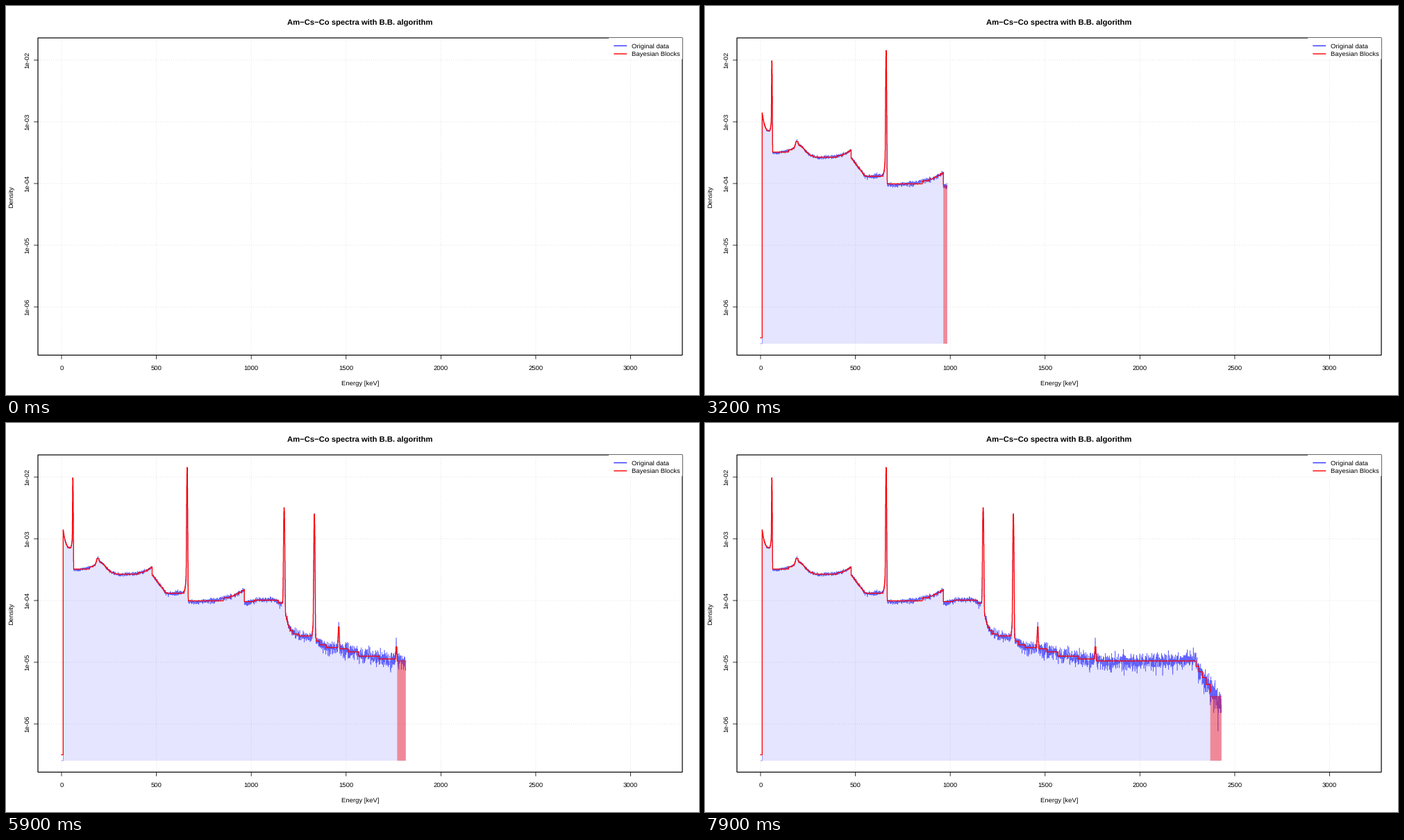
Write a matplotlib script that moves like this. It is 998 by 561 pixels and loops after 8000 ms.

```python
import numpy as np
import matplotlib.pyplot as plt
from matplotlib.animation import FuncAnimation
from matplotlib.patches import Polygon, Rectangle

W, H, PX = 998, 561, 0.72           # stage size, points per pixel
FRAMES, BINS_PER_FRAME = 80, 40
BIN = 0.769                         # keV per channel
FLOOR_Y, SHADE_FROM = 487, 32
BLUE, RED = (0, 0, 1, 0.6), "red"

plt.rcParams.update({"font.family": "Liberation Sans", "text.hinting": "none",
                     "path.simplify": False, "path.snap": False})


def x_px(energy):
    return 80 + np.asarray(energy) * 0.27317


def y_px(density):
    return 78 - 89 * (np.log10(density) + 2)


def density_at(y):
    return 10 ** (-2 - (np.asarray(y) - 78) / 89)


UNIT = density_at(FLOOR_Y)          # density of a single count


# Shapes in energy, all between 0 and 1
def bump(e, mu, sigma):
    return np.exp(-0.5 * ((e - mu) / sigma) ** 2)


def rise(e, edge, scale):
    return np.where(e < edge, np.exp(np.minimum(e - edge, 0) / scale), 0)


def ramp(e, a, b):
    return np.clip((e - a) / (b - a), 0, 1)


def settle(e, start, scale):
    return 1 - np.exp(-np.maximum(e - start, 0) / scale)


def compton_edge(e):
    return e / (1 + 511 / (2 * e))


# Photopeaks: energy, top, width
PEAKS = [(59.5, 79, 1.2), (661.7, 64, 1.55), (1173.2, 122, 2.0),
         (1332.5, 131, 1.9), (1460.8, 292, 2.5), (1764.5, 320, 2.5)]
# Compton shelves: energy, rise to the edge, fall after it, step at the line
SHELVES = [(661.7, 12, 27, 13, 3), (1173.2, 19, -4, 41, 25),
           (1332.5, 0, 12, 18, 40)]


def continuum(e):
    """Height of the smooth background, in stage pixels."""
    low = 28 + 31 * np.exp(-(e - 8) / 14) + 22 * rise(e, 59.5, 5)
    y = 212 - np.where(e < 61.5, low, 0)
    y += 7 * ramp(e, 220, 300) - 3 * bump(e, 150, 30)
    y -= 10 * bump(e, 205, 25) + 8 * bump(e, 190, 6)        # backscatter
    for line_e, up, fall, step, scale in SHELVES:
        edge = compton_edge(line_e)
        y -= up * rise(e, edge, 0.095 * edge)
        y += fall * ramp(e, edge, edge + 75) + step * settle(e, line_e, scale)
    y += 19 * settle(e, 1500, 150) - 8 * rise(e, 2295, 60)
    return y + 65 * ramp(e, 2290, 2430)


def spectrum(e):
    rho = density_at(continuum(e))
    for mu, top, sigma in PEAKS:
        shape = bump(e, mu, sigma) + 0.03 * rise(e, mu, 4)
        rho += (density_at(top) - rho) * shape
    return np.where(e < 8, density_at(478.5), rho)


def split_blocks(rho):
    """Start a block wherever the level leaves the noise band of the last."""
    y, tol = y_px(rho), 1 + 35 / np.sqrt(rho / UNIT)
    starts = [0]
    for i in range(1, len(y)):
        if abs(y[i] - y[starts[-1]]) > tol[i]:
            starts.append(i)
    return np.array(starts)


n_bins = FRAMES * BINS_PER_FRAME
energy = np.arange(n_bins) * BIN
edge_x = x_px(np.arange(n_bins + 1) * BIN)
truth = spectrum(energy)

# Weak jumps need more data before their block shows
starts = split_blocks(truth)
means = np.add.reduceat(truth, starts) / np.diff(np.append(starts, n_bins))
jump = np.diff(np.log(means), prepend=-99)
ready = starts + np.minimum(60 / (means / UNIT * jump ** 2 + 1e-9), 300)
block_x, block_y = edge_x[starts], y_px(means)

counts = np.random.default_rng(7).poisson(truth / UNIT)
counts[energy < 8] = 0
data = np.maximum(counts, 1) * UNIT
data_y = y_px(data)

fig = plt.figure(figsize=(W / 100, H / 100), dpi=100, facecolor="white")
ax = fig.add_axes([0, 0, 1, 1])
ax.set_xlim(0, W)
ax.set_ylim(H, 0)
ax.axis("off")


def line(xs, ys, color="black", width=1.0, **kw):
    return ax.plot(xs, ys, color=color, lw=width * PX, **kw)[0]


def label(x, y, text, size=9.5, **kw):
    kw = {"ha": "center", "va": "baseline", "rotation_mode": "anchor",
          "zorder": 9, **kw}
    ax.text(x, y, text, fontsize=size * PX, **kw)


def draw_frame():
    dots = dict(color="lightgray", width=0.8, zorder=1, linestyle=(0, (1, 3)))
    for e in range(0, 3001, 500):
        x = float(x_px(e))
        line([x, x], [503.5, 46], **dots)
        line([x, x], [503.5, 509], width=0.8)
        label(x, 524.5, str(e))
    for k in range(2, 7):
        y = 78 + 89 * (k - 2)
        line([46, 974], [y, y], **dots)
        line([40.5, 46], [y, y], width=0.8)
        label(32.7, y, f"1e-0{k}", rotation=90)
    ax.add_patch(Rectangle((46, 46), 928, 457.5, fill=False, lw=1.2 * PX,
                           ec="black", zorder=6))
    ax.add_patch(Rectangle((868, 46), 106, 30.5, fc="white", lw=0, zorder=7))
    for y, color, text in [(57.4, (0, 0, 1, 0.8), "Original data"),
                           (69, RED, "Bayesian Blocks")]:
        line([876, 893.5], [y, y], color, 1.4, zorder=8)
        label(901, y + 3.6, text, ha="left")
    label(510, 27.3, "Am\u2212Cs\u2212Co spectra with B.B. algorithm", 11.25,
          weight="bold")
    label(510, 547, "Energy [keV]")
    label(10, 275, "Density", rotation=90)


draw_frame()
fill = ax.add_patch(Polygon(np.zeros((3, 2)), fc=(0, 0, 1, 0.1), lw=0, zorder=2))
trace = line([], [], BLUE, 0.6, zorder=3)
blocks = line([], [], RED, 1.3, zorder=5, drawstyle="steps-post",
              solid_joinstyle="miter")
shade = ax.add_patch(Rectangle((0, 0), 0, 0, fc=(1, 0, 0, 0.4), lw=0, zorder=4))
shade_top = line([], [], (1, 0, 0, 0.4), 1.3, zorder=4)


def update(frame):
    n = frame * BINS_PER_FRAME
    for artist in (fill, trace, blocks):
        artist.set_visible(n > 0)
    for artist in (shade, shade_top):
        artist.set_visible(frame >= SHADE_FROM)
    if n == 0:
        return
    end = edge_x[n]
    xs = np.repeat(edge_x[:n + 1], 2)[1:-1]
    ys = np.repeat(data_y[:n], 2)
    trace.set_data(xs, ys)
    outline = np.column_stack([xs, ys])
    fill.set_xy(np.vstack([[80, FLOOR_Y], outline, [end, FLOOR_Y]]))

    last = np.flatnonzero(ready <= n)[-1]
    blocks.set_data(block_x[:last + 1], block_y[:last + 1])

    left, top = block_x[last], y_px(data[starts[last]:n].mean())
    shade.set_bounds(left, top, end - left, FLOOR_Y - top)
    shade_top.set_data([left, end], [top, top])


anim = FuncAnimation(fig, update, frames=FRAMES, interval=100, repeat=True,
                     repeat_delay=0, init_func=lambda: update(0))
plt.show()
```
